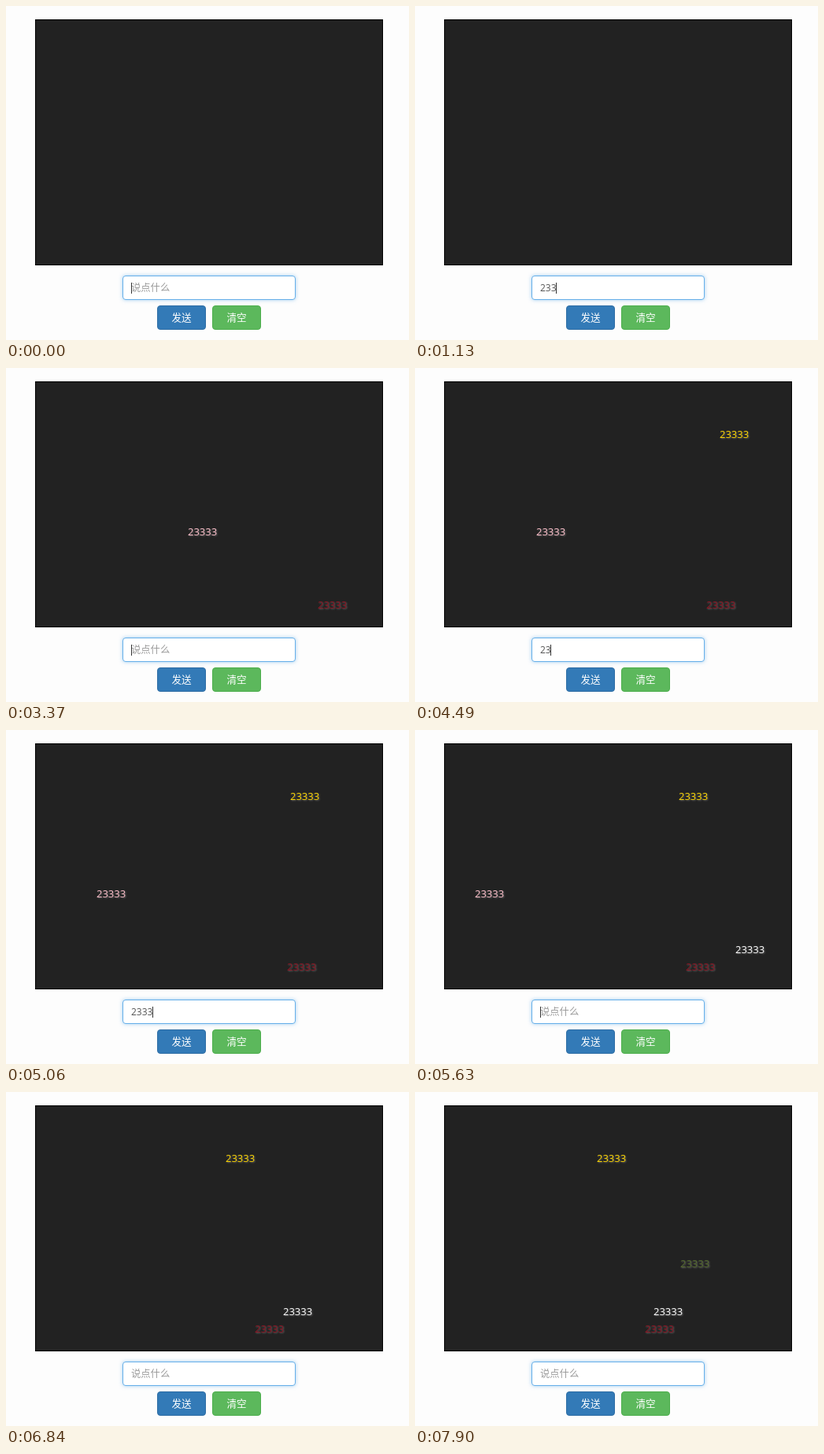
An HTML page that plays this animation: 512 by 425 pixels, repeating every 8 s.

```html
<!DOCTYPE html>
<html lang="zh-CN">
<head>
<meta charset="utf-8">
<style>
  html, body { margin: 0; width: 100%; height: 100%; overflow: hidden; background: #fdfdfd; }
  div { position: absolute; box-sizing: border-box; white-space: nowrap; }
  #stage { left: 37px; top: 17px; width: 442px; height: 313px; overflow: hidden;
    background: #222; border: 1px solid #000; }
  #stage div { font: 500 13px/20px "Open Sans", "Noto Sans", sans-serif;
    text-shadow: 1px 1px 2px #666; }
  #field { left: 148px; top: 343px; width: 220px; height: 31px; background: #fff;
    border: 1px solid #66afe9; border-radius: 4px; box-shadow: 0 0 5px rgba(102,175,233,.6); }
  #hint, #typed { left: 10px; top: 0; line-height: 29px; }
  #hint { font-size: 12.3px; font-family: "Noto Sans CJK SC", "Noto Sans CJK", sans-serif; color: #999; }
  #typed { font-size: 12px; font-family: "Open Sans", "Noto Sans", sans-serif; color: #555; }
  #caret { left: 10px; top: 8px; width: 1px; height: 14px; background: #333; }
  .button { top: 381px; width: 62px; height: 31px; border: 1px solid; border-radius: 4px;
    text-align: center; color: #fff;
    font: 500 12.6px/27px "Noto Sans CJK SC", "Noto Sans CJK", sans-serif; }
  #send { left: 192px; background: #337ab7; border-color: #2e6da4; }
  #clear { left: 262px; background: #5cb85c; border-color: #4cae4c; }
</style>
</head>
<body>
<div id="stage"></div>
<div id="field">
  <div id="hint">说点什么</div>
  <div id="typed"></div>
  <div id="caret"></div>
</div>
<div class="button" id="send">发送</div>
<div class="button" id="clear">清空</div>
<script>
const LOOP = 8000, SPEED = 0.0229, BLINK = 500, TEXT = '23333';
const byId = id => document.getElementById(id);
const stage = byId('stage'), hint = byId('hint'), typed = byId('typed'), caret = byId('caret');

// Typed from "start" to "sent", then launched at x after an optional wait
const comments = [
  { color: 'pink', x: 347, y: 208, rate: 3, start: 550, sent: 1710 },
  { color: '#8b1523', x: 400, y: 301, rate: 1, start: 2140, sent: 3240 },
  { color: 'gold', x: 388.5, y: 84, rate: 2, start: 3510, sent: 4070, wait: 420 },
  { color: 'white', x: 422.5, y: 279, rate: 2, start: 4240, sent: 5330 },
  { color: 'darkolivegreen', x: 383, y: 218, rate: 5, start: 6970, sent: 7360, wait: 150 }
];
for (const c of comments) {
  c.node = stage.appendChild(document.createElement('div'));
  c.node.textContent = TEXT;
  c.node.style.color = c.color;
  c.node.style.top = c.y - 28 + 'px';
}

const show = (node, on) => node.style.visibility = on ? 'visible' : 'hidden';

// Number of characters in the field and the time of the last edit
function fieldAt(t) {
  const c = comments.findLast(c => c.start <= t);
  if (!c) return [0, -100];
  if (t >= c.sent) return [0, c.sent];
  const gap = (c.sent - c.start) / TEXT.length;
  const keys = Math.floor((t - c.start) / gap);
  return [keys + 1, c.start + keys * gap];
}

function draw(now) {
  const t = now % LOOP;
  for (const c of comments) {
    const age = t - c.sent - (c.wait || 0);
    c.node.style.left = Math.floor(c.x - c.rate * SPEED * age) - 39 + 'px';
    show(c.node, age >= 0);
  }

  const [count, edited] = fieldAt(t);
  typed.textContent = TEXT.slice(0, count);
  show(hint, count === 0);
  caret.style.left = 10 + Math.floor(typed.getBoundingClientRect().width + 0.2) + 'px';
  show(caret, Math.floor((t - edited) / BLINK) % 2 === 0);
  requestAnimationFrame(draw);
}
requestAnimationFrame(draw);
</script>
</body>
</html>
```
